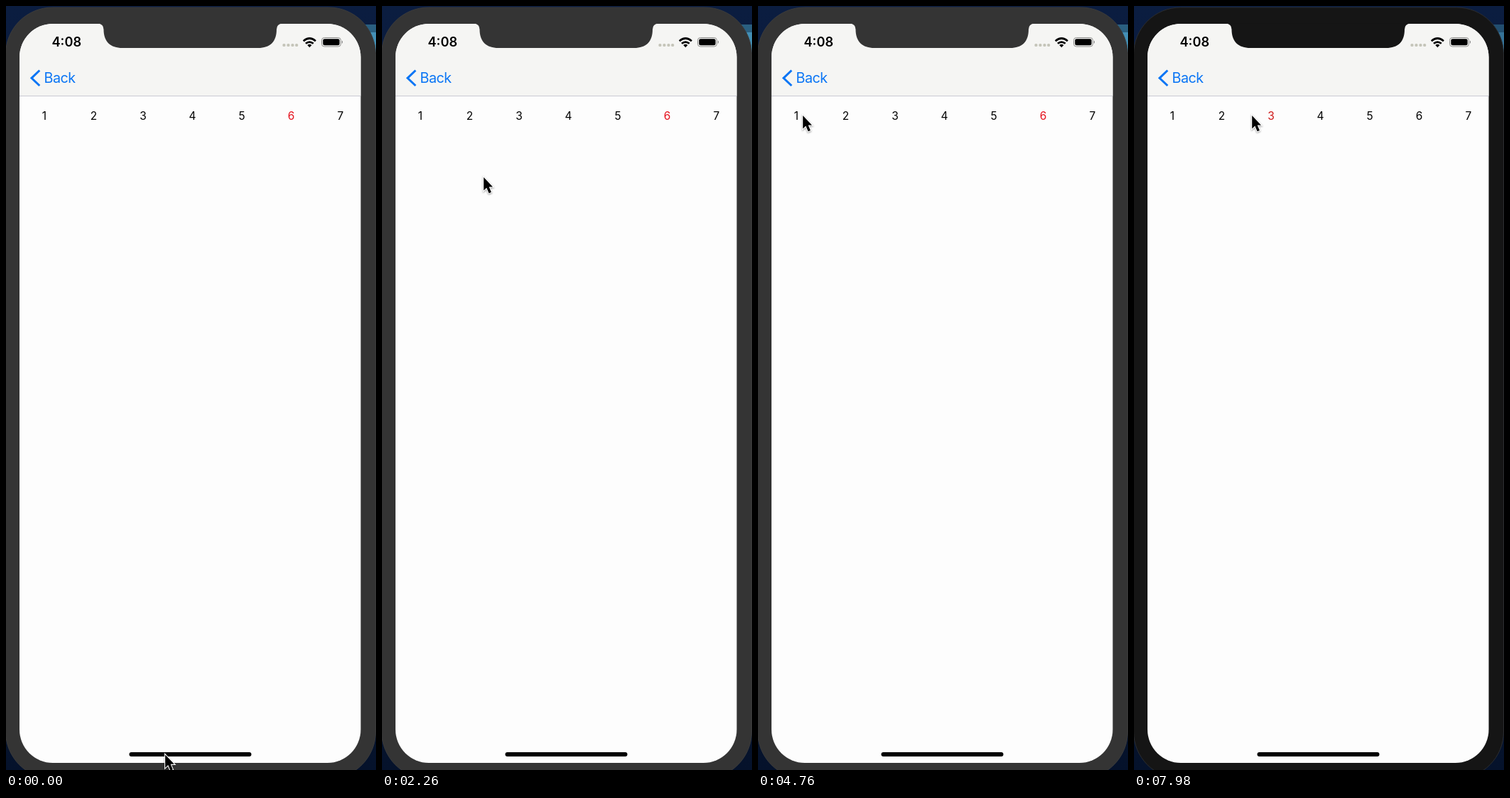
Animation, 521 px wide and 1074 px high, one loop 8 s. Source, as an HTML page:

```html
<!DOCTYPE html>
<html lang="en">
<head>
<meta charset="utf-8">
<title>Week strip</title>
<style>
  html, body { margin: 0; width: 100%; height: 100%; overflow: hidden; background: #06142f; }
  svg { display: block; width: 521px; height: 1074px; font-family: Inter, Roboto, sans-serif; }
  #days { font-size: 15.5px; text-anchor: middle; }
  #cursor { filter: drop-shadow(0 1.5px 1.2px #0006); }
</style>
</head>
<body>
<svg viewBox="0 0 521 1074">
  <defs>
    <linearGradient id="sky" x2="0" y2="1">
      <stop stop-color="#0b1d40"/>
      <stop offset="1" stop-color="#05122b"/>
    </linearGradient>
    <clipPath id="screen"><rect x="19" y="25" width="480.500" height="1039" rx="47"/></clipPath>
  </defs>

  <rect width="521" height="1074" fill="url(#sky)"/>
  <g id="window">
    <rect x="500" y="26" width="21" height="11" fill="#2a5f80"/>
    <rect x="500" y="37" width="21" height="28" fill="#438fb5"/>
  </g>
  <rect id="body" x="-.5" y="2" width="521" height="1084" rx="66"/>

  <g clip-path="url(#screen)">
    <rect width="521" height="1074" fill="#fdfdfd"/>
    <rect width="521" height="126" fill="#f5f5f3"/>
    <rect y="126" width="521" height="1" fill="#c9c9d3"/>
  </g>
  <path id="notch" d="M129 24.500 Q137.500 25 137.500 33 C137.500 50 147 59 164 59 H355 C372 59 381 50 381 33 Q381 25 389.500 24.500Z"/>

  <text x="64.500" y="57" font-size="18.200" font-weight="600">4:08</text>
  <g fill="#c5c5b9">
    <rect x="389.500" y="53" width="4" height="4" rx="1.500"/>
    <rect x="395.500" y="53" width="4" height="4" rx="1.500"/>
    <rect x="401.500" y="53" width="4" height="4" rx="1.500"/>
    <rect x="407.200" y="53" width="4" height="4" rx="1.500"/>
  </g>
  <g fill="none" stroke="#000" stroke-width="2.700">
    <path d="M418.800 49.300 Q427.400 41.700 436 49.300"/>
    <path d="M422 52.800 Q427.400 48.300 432.800 52.800"/>
  </g>
  <path d="M424.300 55 Q427.400 52.500 430.500 55 L427.400 58.200Z"/>
  <rect x="444.500" y="44.500" width="27" height="12.500" rx="3.800" fill="none" stroke="#8c8c8a"/>
  <rect x="446.300" y="46.200" width="23.400" height="9.100" rx="2.300"/>
  <path d="M473 48.600 Q475.200 50.700 473 52.900Z" fill="#777"/>

  <path d="M47.300 90.500 L36 101.300 L47.300 112" fill="none" stroke="#0a75f5" stroke-width="3"/>
  <text x="53.500" y="108" font-size="19.800" letter-spacing="-.5" fill="#0a75f5">Back</text>

  <g id="days"></g>
  <rect x="173.500" y="1049" width="172" height="6" rx="3"/>
  <path id="cursor" d="M1.200 2 V20.500 L5.300 16.600 L8.600 24.300 L11.900 22.900 L8.700 15.400 H14Z"
        stroke="#fff" stroke-width="2.200" paint-order="stroke"/>
</svg>
<script>
const LOOP = 8000;
const ACTIVATE = 5100;

// time, x, y of the pointer tip
const path = [
  [0, 223, 1051], [860, 208, 565], [2260, 142, 239], [3100, 134, 158], [3800, 134, 156],
  [4760, 62, 152], [5250, 62, 152], [5900, 114, 152], [6600, 114, 152],
  [7350, 165, 152], [8000, 165, 152]
];
// time, selected day
const picks = [[0, 6], [ACTIVATE, 1], [6250, 2], [7450, 3]];

const find = id => document.getElementById(id);
const days = Array.from({ length: 7 }, (_, i) => {
  const label = document.createElementNS('http://www.w3.org/2000/svg', 'text');
  label.setAttribute('x', 54 + i * 69.5);
  label.setAttribute('y', 160);
  label.textContent = i + 1;
  return find('days').appendChild(label);
});

const slope = (i, axis) =>
  (path[i + 1][axis] - path[i][axis]) / (path[i + 1][0] - path[i][0]);

// Harmonic mean of neighbouring slopes: smooth, without overshoot
function tangent(i, axis) {
  if (i === 0) return slope(0, axis);
  if (i === path.length - 1) return 0;
  const a = slope(i - 1, axis), b = slope(i, axis);
  return a * b > 0 ? 2 * a * b / (a + b) : 0;
}

function position(time, axis) {
  const i = Math.max(0, path.findIndex(point => point[0] > time) - 1);
  const span = path[i + 1][0] - path[i][0];
  const u = (time - path[i][0]) / span, v = 1 - u;
  return path[i][axis] * (1 + 2 * u) * v * v + path[i + 1][axis] * (3 - 2 * u) * u * u
    + span * u * v * (tangent(i, axis) * v - tangent(i + 1, axis) * u);
}

function draw(now) {
  const time = now % LOOP;
  const active = time >= ACTIVATE;
  const selected = picks.filter(pick => pick[0] <= time).pop()[1];
  const shade = active ? '#151515' : '#343434';

  find('body').setAttribute('fill', shade);
  find('body').setAttribute('stroke', active ? '#2b2d30' : '#3b3b3b');
  find('notch').setAttribute('fill', shade);
  find('window').setAttribute('opacity', active ? 0.75 : 1);
  days.forEach((label, i) => label.setAttribute('fill',
    i + 1 === selected ? (active ? '#cf1a1a' : '#e5101c') : '#000'));
  find('cursor').setAttribute('transform', `translate(${position(time, 1)} ${position(time, 2)})`);
  requestAnimationFrame(draw);
}
draw(performance.now());
</script>
</body>
</html>
```
